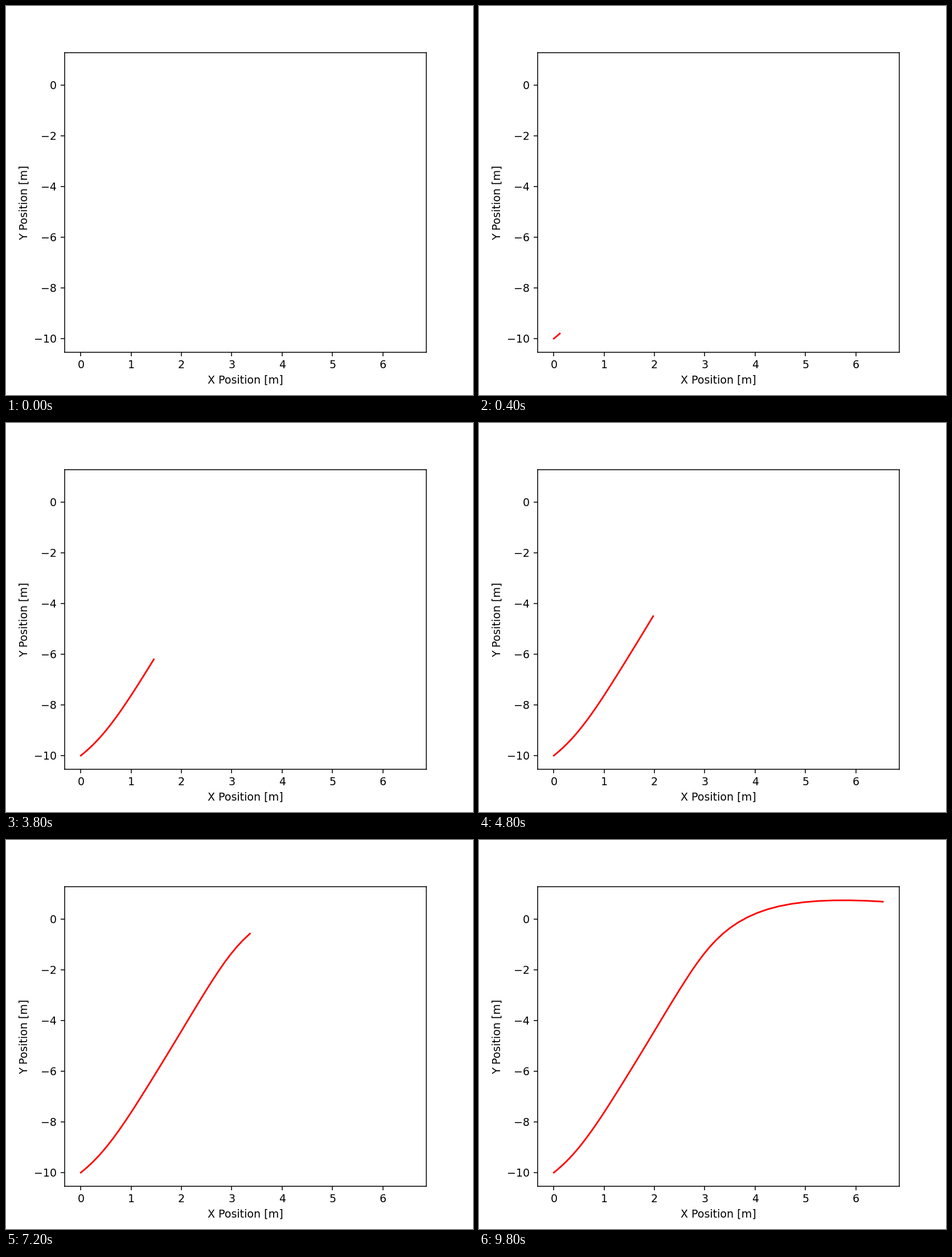
Recreate the animation shown at these times as a matplotlib script. Size 820x683 px, loop 10000 ms.

```python
import matplotlib.pyplot as plt
import numpy as np
from matplotlib.animation import FuncAnimation

FRAMES, INTERVAL = 50, 200
DPI = 136.6
FLASH_FRAME = 1

# Waypoints of the trajectory: frame index and position in metres
KNOTS = np.array([0, 6, 12, 18, 24, 30, 36, 42, 49], float)
X_KNOTS = np.array([0, .376, .818, 1.351, 1.973, 2.629, 3.361, 4.473, 6.538])
Y_KNOTS = np.array([-10, -9.294, -8.161, -6.521, -4.5, -2.375, -.571, .508, .69])


def spline(t, knots, values, start_slope, end_slope):
    """Cubic spline with fixed slopes at both ends."""
    n = len(knots)
    h = np.diff(knots)
    chord = np.diff(values) / h
    system, rhs = np.eye(n), np.zeros(n)
    rhs[0], rhs[-1] = start_slope, end_slope
    for k in range(1, n - 1):
        a, b = h[k - 1], h[k]
        system[k, k - 1:k + 2] = b, 2 * (a + b), a
        rhs[k] = 3 * (b * chord[k - 1] + a * chord[k])
    slope = np.linalg.solve(system, rhs)

    k = np.clip(np.searchsorted(knots, t, side="right") - 1, 0, n - 2)
    w, u = h[k], (t - knots[k]) / h[k]
    return (values[k] * (1 + 2 * u) * (1 - u) ** 2
            + values[k + 1] * u ** 2 * (3 - 2 * u)
            + w * slope[k] * u * (1 - u) ** 2
            + w * slope[k + 1] * u ** 2 * (u - 1))


steps = np.arange(FRAMES)
xs = spline(steps, KNOTS, X_KNOTS, .0577, .344)
ys = spline(steps, KNOTS, Y_KNOTS, .092, -.045)

plt.rcParams["font.family"] = "DejaVu Sans"
fig, ax = plt.subplots(figsize=(6.003, 5), dpi=DPI)
ax.set_xlim(-.3269, 6.8649)
ax.set_ylim(-10.537, 1.281)
ax.set_xticks(range(0, 7))
ax.set_yticks(range(-10, 1, 2))
ax.set_xlabel("X Position [m]")
ax.set_ylabel("Y Position [m]")
path, = ax.plot([], [], lw=1.5)


def draw(i):
    flash = i == FLASH_FRAME
    background = "#373737" if flash else "white"
    fig.set_facecolor(background)
    ax.set_facecolor(background)
    path.set_color("#121212" if flash else "red")
    count = i + 1 if i else 0
    path.set_data(xs[:count], ys[:count])
    return path,


anim = FuncAnimation(fig, draw, frames=FRAMES, interval=INTERVAL,
                     repeat=True, repeat_delay=0, blit=False)
plt.show()
```
